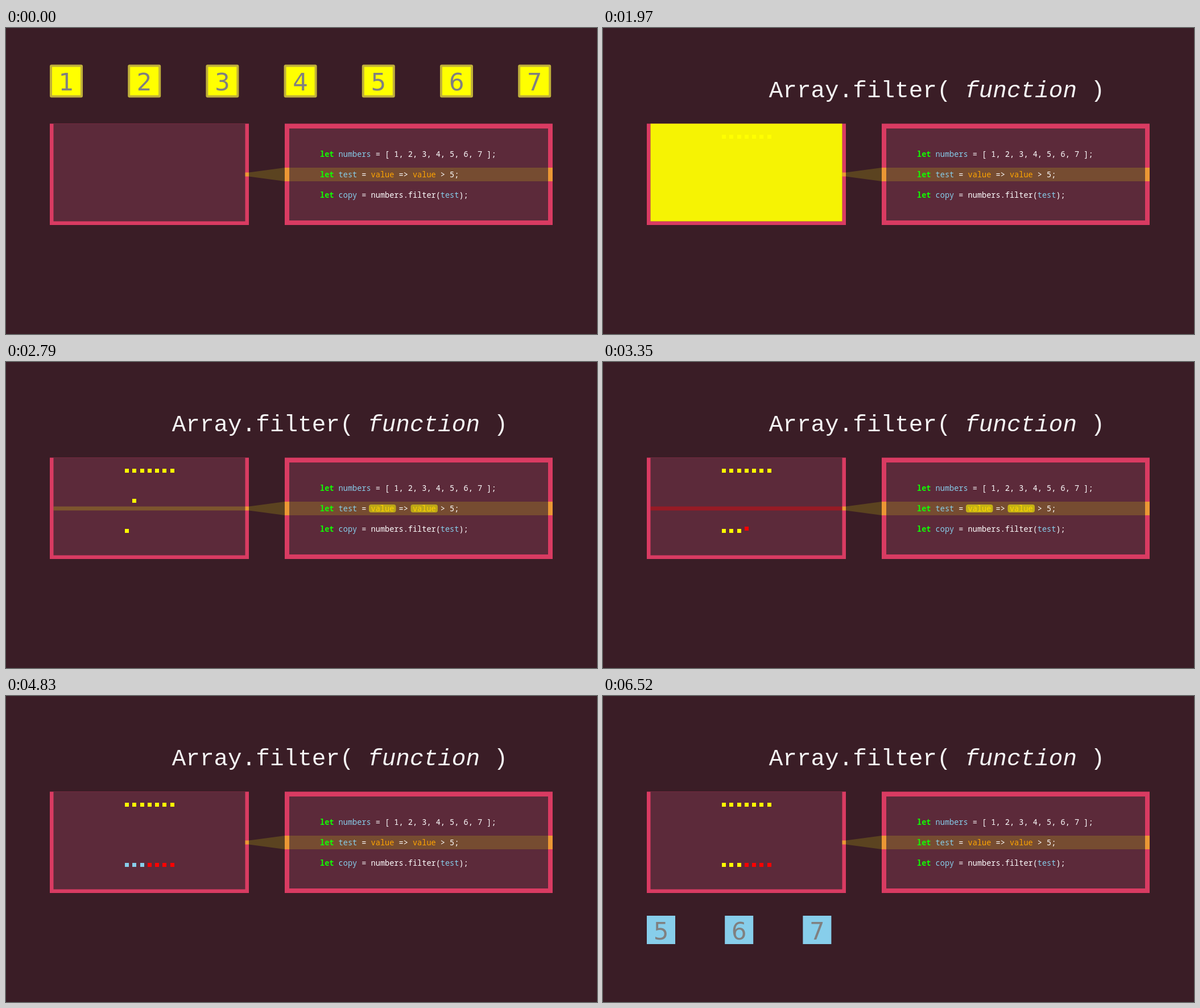
These frames come from a looping animation (1039 by 539 pixels, 8 s). An HTML page with a canvas:

```html
<!DOCTYPE html>
<html lang="en">
<head>
<meta charset="utf-8">
<style>
  html, body { margin: 0; width: 100%; height: 100%; overflow: hidden; background: #3a1d26; }
  canvas { display: block; }
</style>
</head>
<body>
<canvas id="stage" width="1039" height="539"></canvas>
<script>
const ctx = document.getElementById('stage').getContext('2d');
const LOOP = 8000, COUNT = 7, DOT = 6.6, PITCH = 13.25;
const YELLOW = '#ffff00', SKY = '#87ceeb', RED = '#ff0000', PINK = '#d93b62', PANEL = '#5c2a3a';
const TOP_Y = 191.5, LOW_Y = 297.6, BEAM_Y = 258;
const FLY = { start: 930, gap: 100, time: 300 };
const DROP = { start: 2449, time: 227.7 };
const RETURN = { start: 5795, gap: 100, time: 500 };
const PASSED = 3;

const CODE = [
  [227, ['let ', '#1f0', 700], ['numbers ', SKY], ['= [ ', '#fff'], ['1, 2, 3, 4, 5, 6, 7', '#fff', 500], [' ];', '#fff']],
  [263, ['let ', '#1f0', 700], ['test ', SKY], ['= ', '#fff'], ['value ', 'orange'], ['=> ', '#fff'], ['value ', 'orange'], ['> 5;', '#fff', 500]],
  [299, ['let ', '#1f0', 700], ['copy ', SKY], ['= ', '#fff'], ['numbers.filter(', '#fff', 500], ['test', SKY], [');', '#fff', 500]]
];

const clamp = x => Math.max(0, Math.min(1, x));
const ramp = (t, a, b) => clamp((t - a) / (b - a));
const mix = (a, b, p) => a + (b - a) * p;
const dotX = i => 212.3 + PITCH * i;
const boxX = i => 77 + 137.2 * i;

// cubic-bezier(0, 0, .58, 1)
function easeOut(x) {
  let lo = 0, hi = 1;
  for (let n = 0; n < 20; n++) {
    const u = (lo + hi) / 2;
    if (1.74 * u * u - 0.74 * u ** 3 < x) lo = u; else hi = u;
  }
  return 3 * lo * lo - 2 * lo ** 3;
}

function overshoot(x) {
  const s = 5, u = x - 1;
  return 1 + (s + 1) * u ** 3 + s * u * u;
}

function rect(x, y, w, h, color, alpha = 1, radius = 0) {
  ctx.globalAlpha = alpha;
  ctx.fillStyle = color;
  ctx.beginPath();
  ctx.roundRect(x, y, w, h, radius);
  ctx.fill();
  ctx.globalAlpha = 1;
}

function square(cx, cy, size, color, radius = 0) {
  rect(cx - size / 2, cy - size / 2, size, size, color, 1, radius);
}

function dot(cx, cy, color) {
  square(Math.round(cx - 3.3) + 3.5, Math.round(cy - 3.3) + 3.5, 7, color);
}

function text(str, x, y, font, color) {
  ctx.font = font;
  ctx.fillStyle = color;
  ctx.fillText(str, x, y);
  return x + ctx.measureText(str).width;
}

function digit(n, cx, baseline) {
  ctx.textAlign = 'center';
  text(n, cx, baseline, '42px "DejaVu Sans", sans-serif', '#808080');
  ctx.textAlign = 'left';
}

function drawPanels() {
  rect(77, 168.5, 350, 178.5, PINK);
  rect(83.5, 168.5, 337, 172, PANEL);
  rect(490, 168.5, 471, 178.5, PINK);
  rect(498, 177, 455, 162, PANEL);

  rect(498, 246, 455, 24, YELLOW, 0.16);
  rect(490, 246, 8, 24, YELLOW, 0.47);
  rect(953, 246, 8, 24, YELLOW, 0.47);
  rect(420.5, 254.5, 6.5, 7, YELLOW, 0.47);
  ctx.globalAlpha = 0.17;
  ctx.beginPath();
  ctx.moveTo(427, 254.5);
  ctx.lineTo(490, 246);
  ctx.lineTo(490, 270);
  ctx.lineTo(427, 261.5);
  ctx.fillStyle = YELLOW;
  ctx.fill();
  ctx.globalAlpha = 1;
}

function drawCode() {
  for (const [y, ...parts] of CODE) {
    let x = 552;
    for (const [str, color, weight = 400] of parts)
      x = text(str, x, y, weight + ' 13.58px "Noto Sans Mono", monospace', color);
  }
}

function drawTitle(t) {
  const font = '41px "Liberation Mono", monospace';
  ctx.globalAlpha = ramp(t, 1640, 1940);
  const x = text('Array.filter( ', 291.7, 122, font, '#f5f5f5');
  const end = text('function', x, 122, 'italic ' + font, '#f5f5f5');
  text(' )', end, 122, font, '#f5f5f5');
  ctx.globalAlpha = 1;
}

function drawNumbers(t) {
  const grow = 4 * overshoot(ramp(t, 15, 825));
  for (let i = 0; i < COUNT; i++) {
    const x = (t - FLY.start - FLY.gap * i) / FLY.time;
    if (x <= 0) {
      const cx = boxX(i) + 29, size = 58 + 2 * grow;
      square(cx, 93.5, size, '#bfb03a', 3);
      square(cx, 93.5, size - 8, YELLOW);
      digit(i + 1, cx, 110);
    } else if (x < 1) {
      const p = easeOut(x);
      square(mix(boxX(i) + 25, dotX(i), p), mix(90, TOP_Y, p), mix(58, DOT, p), YELLOW, 2 * (1 - p));
    } else {
      dot(dotX(i), TOP_Y, YELLOW);
    }
  }
}

function drawTest(t) {
  const shown = ramp(t, 2450, 2520) * (1 - ramp(t, 4080, 4270));
  const crossing = DROP.start + DROP.time * (PASSED + 0.62);
  const failed = t > crossing;
  rect(83.5, 254.5, 337, 7, failed ? RED : YELLOW, shown * (failed ? 0.36 : 0.2));
  const glow = shown * mix(0.5, 0.63, ramp(t, 2790, 3900));
  for (const x of [638, 711.5]) rect(x, 251, 47.5, 14, YELLOW, glow, 4);

  for (let i = 0; i < COUNT; i++) {
    const p = clamp((t - DROP.start) / DROP.time - i);
    if (p === 0) continue;
    const y = mix(TOP_Y, LOW_Y, p);
    let color = YELLOW;
    if (i >= PASSED && y > BEAM_Y) color = RED;
    else if (i < PASSED && t >= 4830 && t < RETURN.start + RETURN.gap * i) color = SKY;
    dot(dotX(i), y, color);
  }
}

function drawCopies(t) {
  for (let i = 0; i < PASSED; i++) {
    const x = (t - RETURN.start - RETURN.gap * i) / RETURN.time;
    if (x <= 0) continue;
    const p = easeOut(clamp(x)), cx = boxX(i) + 25;
    square(mix(dotX(i), cx, p), mix(LOW_Y, 412, p), mix(DOT, 50, p), SKY);
    if (x >= 1) digit(i + 5, cx, 429);
  }
}

function draw(t) {
  rect(0, 0, 1039, 539, '#3a1d26');
  drawPanels();
  drawCode();
  const flash = Math.min(ramp(t, 1730, 1985), 1 - ramp(t, 1985, 2265));
  rect(83.5, 168.5, 337, 172, YELLOW, flash);
  drawTitle(t);
  drawNumbers(t);
  drawTest(t);
  drawCopies(t);
}

const begin = performance.now();
function frame() {
  draw((performance.now() - begin) % LOOP);
  requestAnimationFrame(frame);
}
frame();
</script>
</body>
</html>
```
